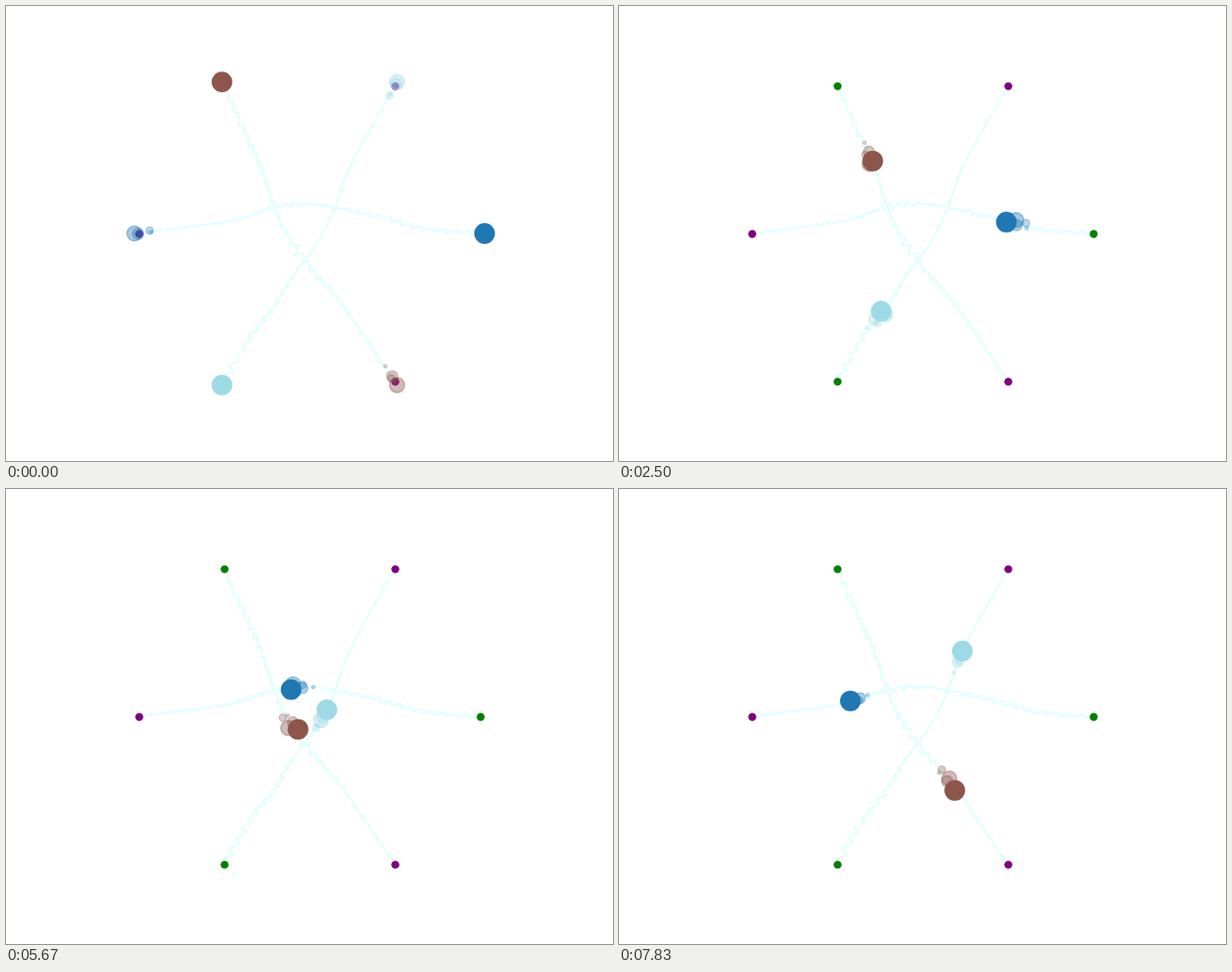
Animation of 640 by 480 pixels, one loop 8 s. Source, as an HTML page with a canvas:

```html
<!DOCTYPE html>
<html lang="en">
<head>
<meta charset="utf-8">
<title>Crossing agents</title>
<style>
  html, body { margin: 0; width: 100%; height: 100%; overflow: hidden; background: #fff; }
  canvas { display: block; }
</style>
</head>
<body>
<canvas id="stage" width="640" height="480"></canvas>
<script>
const ctx = document.getElementById('stage').getContext('2d');
const LOOP = 8000, FPS = 6, LAST = 63;
const BALL_SCALE = 1.0256; // balls are plotted slightly wider than lines and dots
const KEY_STEPS = [0, 9, 15, 23, 30, 38, 47, LAST];

// Each agent crosses the ring through `via`, wobbling to either side on alternate steps.
// The wobble direction swings from `angle` by `turn` degrees around step `turnAt`.
const agents = [
  { color: '#1f77b4', corner: 0, wobble: 3, angle: -40, turn: 195, turnAt: 33.5,
    via: [[443.8, 235.1], [410.8, 226.1], [364.2, 215.2], [321.1, 208.1], [279.4, 212.1], [241.4, 225.1]] },
  { color: '#8c564b', corner: 4, wobble: 4, angle: 102, turn: -212, turnAt: 32,
    via: [[253.2, 137.4], [266.9, 167.5], [280.6, 208], [293.3, 237.5], [317.7, 273.8], [353, 314.1]] },
  { color: '#9edae5', corner: 2, wobble: 3.8, angle: 8, turn: -68, turnAt: 19,
    via: [[257.3, 349.7], [280.2, 321.3], [302.8, 284.5], [326.4, 253.2], [345.1, 217.8], [363.9, 167.7]] }
];

const scaled = ([x, y], s) => [320 + (x - 320) * s, 240 + (y - 240) * s];

function corner(i) {
  const angle = i * Math.PI / 3;
  return [320 + 180 * Math.cos(angle), 240 + 180 * Math.sin(angle)];
}

// The ring is slightly flattened: its upper and lower corners lie 156 px from the middle.

function spline(points, step) {
  const i = Math.max(0, KEY_STEPS.findIndex(k => k >= step) - 1);
  const span = KEY_STEPS[i + 1] - KEY_STEPS[i];
  const u = (step - KEY_STEPS[i]) / span;
  const slope = (k, axis) => {
    const a = Math.max(0, k - 1), b = Math.min(LAST_KEY, k + 1);
    return (points[b][axis] - points[a][axis]) / (KEY_STEPS[b] - KEY_STEPS[a]) * span;
  };
  return [0, 1].map(axis => {
    const p = points[i][axis], q = points[i + 1][axis];
    const ease = u * u * (3 - 2 * u);
    return p + (q - p) * ease
      + slope(i, axis) * u * (1 - u) ** 2
      - slope(i + 1, axis) * u * u * (1 - u);
  });
}
const LAST_KEY = KEY_STEPS.length - 1;

function positionAt(agent, points, step) {
  const [x, y] = spline(points, step);
  const swing = 1 / (1 + Math.exp((agent.turnAt - step) / 4));
  const angle = (agent.angle + agent.turn * swing) * Math.PI / 180;
  const reach = agent.wobble * (step % 2 ? -1 : 1) * Math.min(1, step, LAST - step);
  return [x + reach * Math.cos(angle), y + reach * Math.sin(angle)];
}

for (const agent of agents) {
  const ends = [agent.corner, agent.corner + 3].map(i => scaled(corner(i), BALL_SCALE));
  const points = [ends[0], ...agent.via, ends[1]];
  agent.path = Array.from({ length: LAST + 1 }, (_, step) => positionAt(agent, points, step));
}

function disc([x, y], r, color, alpha = 1, edge = 1.39) {
  ctx.globalAlpha = alpha;
  ctx.fillStyle = ctx.strokeStyle = color;
  ctx.lineWidth = edge;
  ctx.beginPath();
  ctx.arc(x, y, r, 0, Math.PI * 2);
  ctx.fill();
  if (edge) ctx.stroke();
  ctx.globalAlpha = 1;
}

function drawLine(path) {
  ctx.strokeStyle = '#e0ffff';
  ctx.lineWidth = 2.08;
  ctx.lineJoin = 'round';
  ctx.beginPath();
  for (const p of path) ctx.lineTo(...scaled(p, 1 / BALL_SCALE));
  ctx.stroke();
}

function drawDots() {
  for (let i = 0; i < 6; i++) {
    const [x, y] = corner(i);
    disc([x + .5, y + .5], 4.2, i % 2 ? '#800080' : '#008000', 1, 0);
  }
}

function draw(step) {
  ctx.fillStyle = '#fff';
  ctx.fillRect(0, 0, 640, 480);
  agents.forEach(a => drawLine(a.path));
  drawDots();
  for (const { path, color } of agents) {
    for (let age = 0; age < 4; age++) {
      const past = path[(step - 1 - age + path.length) % path.length];
      disc(past, 7.9 - 2.05 * age, color, .4 - .05 * age);
    }
    disc(path[step], 10.2, color);
  }
}

function tick() {
  // The small lead absorbs frame times rounded to 10 ms.
  const step = Math.floor(performance.now() % LOOP * FPS / 1000 + .025);
  draw(step % (LOOP * FPS / 1000));
  requestAnimationFrame(tick);
}
tick();
</script>
</body>
</html>
```
